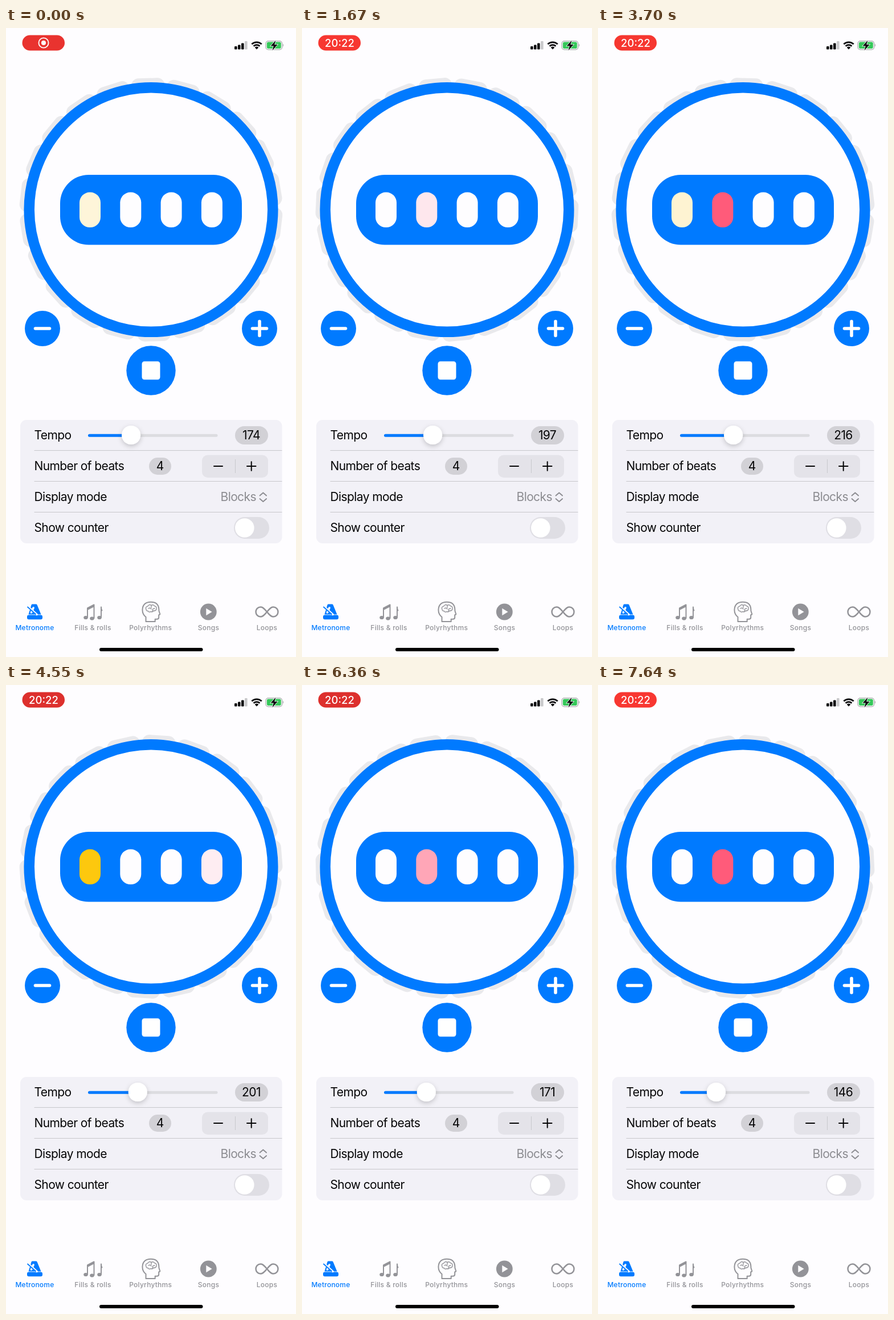
These frames come from a looping animation (509 px wide and 1101 px high, 7.67 s). An HTML page:

```html
<!DOCTYPE html>
<html lang="en">
<head>
<meta charset="utf-8">
<title>Metronome</title>
<style>
  html, body { margin: 0; width: 100%; height: 100%; overflow: hidden; background: #fefdff; }
  svg { display: block; width: 509px; height: 1101px; }
  text { font-family: Inter, Roboto, sans-serif; font-size: 21px; letter-spacing: -.6px; fill: #050506; }
  .mid { text-anchor: middle; }
  .tab { font-size: 12px; font-weight: 500; letter-spacing: .25px; fill: #939398; text-anchor: middle; }
  .line { fill: none; stroke-linecap: round; stroke-linejoin: round; }
  .blue { fill: #007aff; }
</style>
</head>
<body>
<svg viewBox="0 0 509 1101">
  <defs>
    <filter id="shadow" x="-50%" y="-50%" width="200%" height="220%">
      <feDropShadow dx="0" dy="3" stdDeviation="4" flood-opacity=".2"/>
    </filter>
  </defs>

  <!-- status bar -->
  <rect id="pill" x="28.5" y="12.5" width="74.5" height="27" rx="13.5"/>
  <g id="rec" class="line" stroke="#fff" stroke-width="1.8">
    <circle cx="66" cy="26" r="8.6"/><circle cx="66" cy="26" r="4" fill="#fff" stroke="none"/>
  </g>
  <text id="clock" class="mid" x="66" y="33" style="font-size:18.5px;font-weight:500;letter-spacing:0;fill:#fff">20:22</text>
  <g fill="#08080a">
    <rect x="401" y="32" width="4.6" height="5.5" rx="1.2"/>
    <rect x="407" y="29.5" width="4.6" height="8" rx="1.2"/>
    <rect x="413" y="26.5" width="4.6" height="11" rx="1.2"/>
    <rect x="419" y="23" width="4.6" height="14.5" rx="1.2" fill="#c9c9cb"/>
    <path d="M440 37.5l-3.4-3.5a5 5 0 0 1 6.8 0z"/>
  </g>
  <g fill="none" stroke="#08080a" stroke-width="2.8">
    <path d="M434.6 31.8a8 8 0 0 1 10.8 0"/><path d="M431.3 28.2a12.8 12.8 0 0 1 17.4 0"/>
  </g>
  <rect x="456" y="22.8" width="28.6" height="15" rx="4.4" fill="#fff" stroke="#a5a5a9" stroke-width="1.2"/>
  <rect x="457.8" y="24.6" width="25" height="11.4" rx="2.8" fill="#35c759"/>
  <path d="M486 27.5q2.3 2.7 0 5.4z" fill="#a5a5a9"/>
  <path d="M473.5 21.5l-9 10h5.2l-2.3 8 9.2-10.5h-5.4z" fill="#08080a" stroke="#fff" stroke-width="1.4" paint-order="stroke"/>

  <!-- dial -->
  <g id="knurl" fill="#e9e9ec"></g>
  <circle cx="254.5" cy="318" r="213.8" fill="#fefdff" stroke="#007aff" stroke-width="18.5"/>
  <rect class="blue" x="95" y="257" width="319" height="122.5" rx="50"/>
  <g id="blocks"></g>

  <!-- buttons -->
  <g class="blue">
    <circle cx="64" cy="526" r="31"/><circle cx="445" cy="526" r="31"/><circle cx="254.5" cy="599.5" r="43.2"/>
  </g>
  <path class="line" d="M51.5 526h25M432.5 526h25M445 513.5v25" stroke="#fff" stroke-width="5.6"/>
  <rect x="238.5" y="583.5" width="32" height="32" rx="4.5" fill="#fff"/>

  <!-- settings -->
  <rect x="25" y="686" width="459.5" height="216" rx="11" fill="#f2f1f7"/>
  <path d="M49.5 739.5h435M49.5 793.5h435M49.5 847.5h435" stroke="#c7c7cb"/>
  <text x="49.5" y="720">Tempo</text>
  <text x="49.5" y="774">Number of beats</text>
  <text x="49.5" y="828">Display mode</text>
  <text x="49.5" y="882">Show counter</text>

  <rect x="144" y="710.7" width="227.5" height="5" rx="2.5" fill="#dcdce0"/>
  <rect id="fill" class="blue" x="144" y="710.7" height="5" rx="2.5"/>
  <circle id="knob" cy="712.5" r="16.6" fill="#fff" filter="url(#shadow)"/>
  <rect x="402" y="697" width="58" height="32" rx="16" fill="#d2d1d6"/>
  <text id="tempo" class="mid" x="430.5" y="720"></text>

  <rect x="251" y="752" width="39" height="30" rx="15" fill="#d2d1d6"/>
  <text class="mid" x="270.2" y="774">4</text>
  <rect x="344" y="747.5" width="116" height="39.5" rx="10" fill="#e4e3e9"/>
  <path d="M402.5 755v24" stroke="#c9c9ce"/>
  <path class="line" d="M365 767h15M423 767h15.500M430.700 759.300v15.500" stroke="#050506" stroke-width="2"/>

  <text x="376.5" y="828" style="fill:#8b8b90">Blocks</text>
  <path class="line" d="M445.500 818.500l5.800-5 5.800 5M445.500 824l5.800 5 5.800-5" stroke="#8b8b90" stroke-width="1.9"/>
  <rect x="400" y="856" width="62" height="38" rx="19" fill="#dfdee4"/>
  <circle cx="418.800" cy="875" r="16.800" fill="#fff"/>

  <!-- tab bar -->
  <g class="blue">
    <path d="M46.300 1008.500h6.400q1.400 0 2 1.400l6.800 16.600H39.500l5-16.600q.4-1.400 1.800-1.400z"/>
    <rect x="37" y="1027.500" width="27" height="7.700" rx="3"/>
  </g>
  <path class="line" d="M39 1013l15 13.500M44.500 1023l3.500-8" stroke="#fefdff" stroke-width="3.600"/>
  <path class="line" d="M38 1013.500l14 12.500" stroke="#007aff" stroke-width="1.800"/>

  <g fill="#939398">
    <ellipse cx="140" cy="1032" rx="3.800" ry="3.100"/>
    <ellipse cx="151" cy="1033.500" rx="3.800" ry="3.100"/>
    <ellipse cx="164" cy="1032" rx="3.800" ry="3.100"/>
    <circle cx="355.300" cy="1022" r="14.400"/>
  </g>
  <g class="line" stroke="#939398" stroke-width="2">
    <path d="M143 1031.500v-16l11.500-6v23.500M143 1018l11.500-6M167 1031.500v-18q0 4 1.500 6"/>
    <path d="M245.500 1039v-8q-6.500-5-6-13.500 1-12.500 14.500-12.700 13.500 0 14.300 12.200l.200 3.500 1.700 5q.3 1.600-2 1.800v4.200q0 3.300-3.500 3.300h-3v4.200z"/>
    <path d="M246 1018q-2-5 3-6 2-4 6-1.500 4-2 6 1.500 4 1 3 5-1 4-5 3-2 3-5 1.500-3 2-4.500-1-3 .5-3.500-2.500zM250 1016q3-2 5 1M255 1010.500v4M257 1020q0-4 4-4" stroke-width="1.400"/>
    <path d="M458 1022c-5-6-7.500-8.500-11-8.500a8 8 0 0 0 0 17c3.500 0 6-2.500 11-8.500s7.500-8.500 11-8.500a8 8 0 0 1 0 17c-3.500 0-6-2.500-11-8.500z" stroke-width="2.500"/>
  </g>
  <path d="M351.300 1015.800v12.400l10.300-6.200z" fill="#fefdff"/>

  <text class="tab" x="50.500" y="1054" style="fill:#007aff">Metronome</text>
  <text class="tab" x="152.500" y="1054">Fills &amp; rolls</text>
  <text class="tab" x="253.700" y="1054">Polyrhythms</text>
  <text class="tab" x="355.500" y="1054">Songs</text>
  <text class="tab" x="458" y="1054">Loops</text>
  <rect x="164" y="1085" width="181.500" height="6" rx="3"/>
</svg>

<script>
const LOOP = 7670, LOBES = 22;
const $ = id => document.getElementById(id);
const clamp = v => Math.min(1, Math.max(0, v));
const smooth = (a, b, v) => { const u = clamp((v - a) / (b - a)); return u * u * (3 - 2 * u); };
const mix = (a, b, u) => `rgb(${a.map((v, i) => Math.round(v + (b[i] - v) * u))})`;

function rect(parent, attrs) {
  const el = document.createElementNS("http://www.w3.org/2000/svg", "rect");
  for (const k in attrs) el.setAttribute(k, attrs[k]);
  return $(parent).appendChild(el);
}

for (let i = 0; i < LOBES; i++)
  rect("knurl", { x: 225, y: 87.7, width: 59, height: 30, rx: 13, transform: `rotate(${i * 360 / LOBES} 254.5 318)` });
const blocks = [0, 1, 2, 3].map(i =>
  rect("blocks", { x: 129 + i * 71.3, y: 287.6, width: 37, height: 61.5, rx: 18 }));

// Dial drag: time, tempo, angle
const drag = [
  [0, 174, -1.4], [1670, 197, 27.3], [2730, 214, 47.7], [3200, 220, 55], [3500, 219, 54],
  [4550, 201, 36.4], [5790, 180, 1.9], [6360, 171, -9.6], [7640, 146, -43.6], [LOOP, 146, -43.6]
];
function dragAt(t, col) {
  const i = Math.max(1, drag.findIndex(k => k[0] >= t));
  const a = drag[i - 1], b = drag[i];
  return a[col] + (b[col] - a[col]) * clamp((t - a[0]) / (b[0] - a[0]));
}

// Each beat lasts as long as the tempo at its start says
const beats = [];
for (let t = -292; t < LOOP; t += 60000 / dragAt(t, 1)) beats.push(t);

const WHITE = [254, 253, 255], YELLOW = [253, 200, 14], PINK = [255, 91, 122];

function draw(t) {
  const tempo = dragAt(t, 1), x = 219.6 + (tempo - 174) * .433;
  $("knurl").setAttribute("transform", `rotate(${dragAt(t, 2)} 254.5 318)`);
  $("knob").setAttribute("cx", x);
  $("fill").setAttribute("width", x - 144);
  $("tempo").textContent = Math.round(tempo);

  blocks.forEach((el, i) => {
    const start = beats.filter((b, n) => n % 4 === i && b <= t).pop();
    const glow = start === undefined ? 0 : 1 - smooth(168, 335, t - start);
    el.setAttribute("fill", mix(WHITE, i ? PINK : YELLOW, glow));
  });

  const pulse = .5 + .5 * Math.cos((t - 1450) / 1000 * Math.PI);
  $("pill").setAttribute("fill", mix([220, 48, 45], [251, 56, 49], pulse));
  const shown = smooth(600, 850, t);
  $("rec").setAttribute("opacity", 1 - shown);
  $("clock").setAttribute("opacity", shown);
}

const begin = performance.now();
function tick() {
  draw((performance.now() - begin) % LOOP);
  requestAnimationFrame(tick);
}
tick();
</script>
</body>
</html>
```
